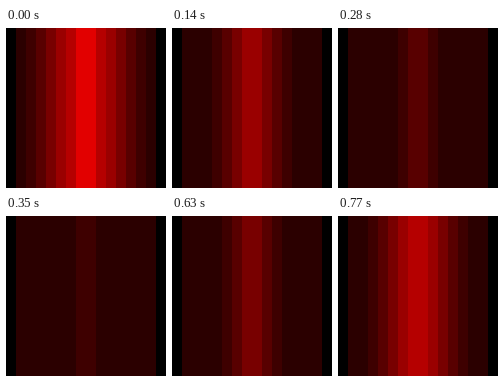
Animation of 160x160 px, one loop 840 ms. Source, as an HTML page with a canvas:

```html
<!DOCTYPE html>
<html lang="en">
<head>
<meta charset="utf-8">
<title>Red pulse</title>
<style>
  html, body { margin: 0; width: 100%; height: 100%; overflow: hidden; background: #000; }
  canvas { display: block; width: 160px; height: 160px; }
</style>
</head>
<body>
<canvas id="stage" width="160" height="160"></canvas>
<script>
const ctx = document.getElementById('stage').getContext('2d');
const STEP = 70;
const STEPS = 12;
const BAR = 10;
const reds = [226, 181, 154, 120, 88, 62, 43];

// The red ramp slides inwards, rests at its darkest, then slides back out.
function draw(time) {
  const step = Math.floor(time / STEP) % STEPS;
  const shift = Math.min(step, STEPS - step, 5);
  ctx.fillStyle = '#000';
  ctx.fillRect(0, 0, 160, 160);
  for (let dist = 0; dist < 7; dist++) {
    const red = reds[Math.min(dist + shift, reds.length - 1)];
    ctx.fillStyle = `rgb(${red}, 0, 0)`;
    ctx.fillRect(80 - (dist + 1) * BAR, 0, BAR, 160);
    ctx.fillRect(80 + dist * BAR, 0, BAR, 160);
  }
}

const start = performance.now();
function tick() {
  draw(performance.now() - start);
  requestAnimationFrame(tick);
}
tick();
</script>
</body>
</html>
```
